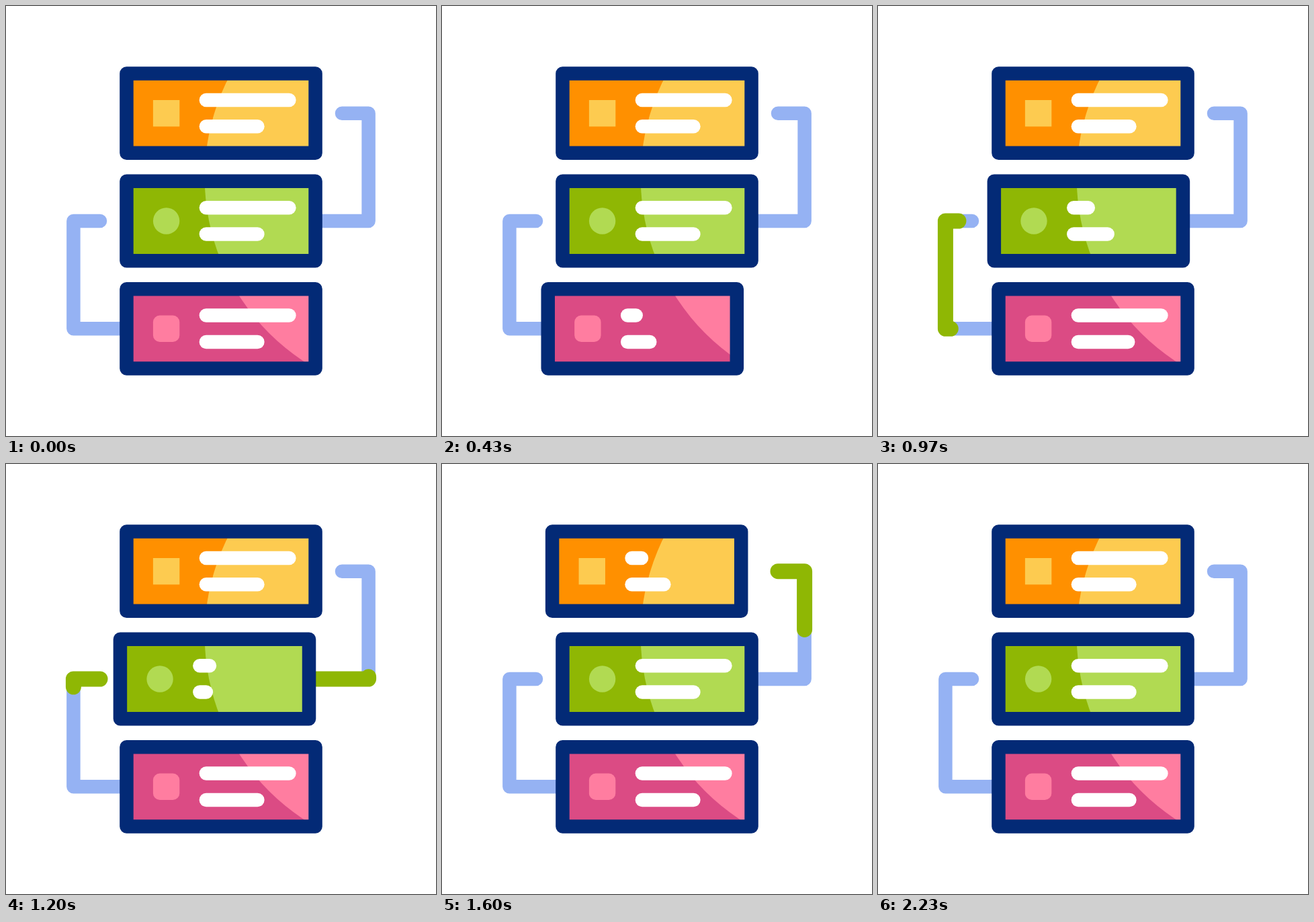
These frames come from a looping animation (640 by 640 pixels, 2.37 s). An HTML page:

```html
<!DOCTYPE html>
<html lang="en">
<head>
<meta charset="utf-8">
<title>Stacked cards</title>
<style>
html, body { margin: 0; width: 100%; height: 100%; overflow: hidden; background: #fff; }
svg { display: block; width: 100%; height: 100%; }
</style>
</head>
<body>
<svg id="stage" viewBox="0 0 640 640" fill="none" stroke-linecap="round" stroke-linejoin="round"></svg>
<script>
const LOOP = 2370, STEPS = 71;
const NAVY = '#032a76', BLUE = '#95b2f3', GREEN = '#8fb704';
const stage = document.getElementById('stage');

function add(parent, tag, attrs) {
  const el = document.createElementNS('http://www.w3.org/2000/svg', tag);
  for (const k in attrs) el.setAttribute(k, attrs[k]);
  return parent.appendChild(el);
}

// Eased progress of s between a and b
function ease(s, a, b) {
  const p = Math.min(1, Math.max(0, (s - a) / (b - a)));
  return p * p * (3 - 2 * p);
}

const wires = [
  { d: 'M200.4 480.3H100.4V320H140', start: 13 },
  { d: 'M439.6 320H539.6V159.7H500', start: 28.5 }
];
for (const w of wires) {
  add(stage, 'path', { d: w.d, stroke: BLUE, 'stroke-width': 20.5 });
  w.pulse = add(stage, 'path', { d: w.d, stroke: GREEN, 'stroke-width': 23 });
  w.len = w.pulse.getTotalLength();
}

const cards = [
  { y: 159.7, start: 36, lag: 0.7, dark: '#ff9000', light: '#fdcb50', round: 0 },
  { y: 320, start: 18, lag: 0, dark: '#8fb704', light: '#b1da52', round: 19.7 },
  { y: 480.3, start: 0, lag: 0, dark: '#db4b84', light: '#ff7da0', round: 10 }
];
cards.forEach((c, i) => {
  const box = { x: 179.45, y: c.y - 59.15, width: 281.1, height: 118.3 };
  const clip = add(add(stage, 'defs', {}), 'clipPath', { id: 'clip' + i });
  c.mask = add(clip, 'rect', box);
  c.back = add(stage, 'rect', { ...box, fill: c.dark });
  // The shine stays still while the card slides over it
  add(stage, 'circle', { cx: 623.4, cy: 255.3, r: 327.7, fill: c.light, 'clip-path': `url(#clip${i})` });
  c.front = add(stage, 'g', {});
  add(c.front, 'rect', { ...box, stroke: NAVY, 'stroke-width': 20.5 });
  add(c.front, 'rect', { x: 218.9, y: c.y - 19.7, width: 39.4, height: 39.4, rx: c.round, fill: c.light });
  c.bars = [-19.8, 19.6].map(dy => add(c.front, 'line', {
    x1: 297.9, x2: 297.9, y1: c.y + dy, y2: c.y + dy, stroke: '#fff', 'stroke-width': 20.5
  }));
});

function slide(s) {
  return 20.5 * ease(s, 0, 7) - 44.7 * ease(s, 7, 14) + 24.2 * ease(s, 14, 21);
}

function setBar(bar, width) {
  bar.setAttribute('x2', 297.9 + width - 20.5);
}

function draw(n) {
  for (const c of cards) {
    const s = n - c.start, move = `translate(${slide(s)} 0)`;
    for (const el of [c.mask, c.back, c.front]) el.setAttribute('transform', move);
    setBar(c.bars[0], 144 - 111 * (ease(s, 2.5, 12.8) - ease(s, 17.2, 27.1)));
    const late = s - c.lag;
    setBar(c.bars[1], 97 - 67 * (ease(late, 6.1, 17.6) - ease(late, 22.4, 29.8)));
  }
  for (const w of wires) {
    const s = n - w.start;
    const head = w.len * ease(s, 0, 19), tail = w.len * ease(s, 9, 28);
    const on = head - tail > 0.1;
    w.pulse.setAttribute('visibility', on ? 'visible' : 'hidden');
    w.pulse.setAttribute('stroke-dasharray', `${on ? head - tail : 1} 2000`);
    w.pulse.setAttribute('stroke-dashoffset', -tail);
  }
}

const begin = performance.now();
function tick() {
  const t = (performance.now() - begin) % LOOP;
  draw(Math.floor((t + 8) * STEPS / LOOP) % STEPS);
  requestAnimationFrame(tick);
}
tick();
</script>
</body>
</html>
```
